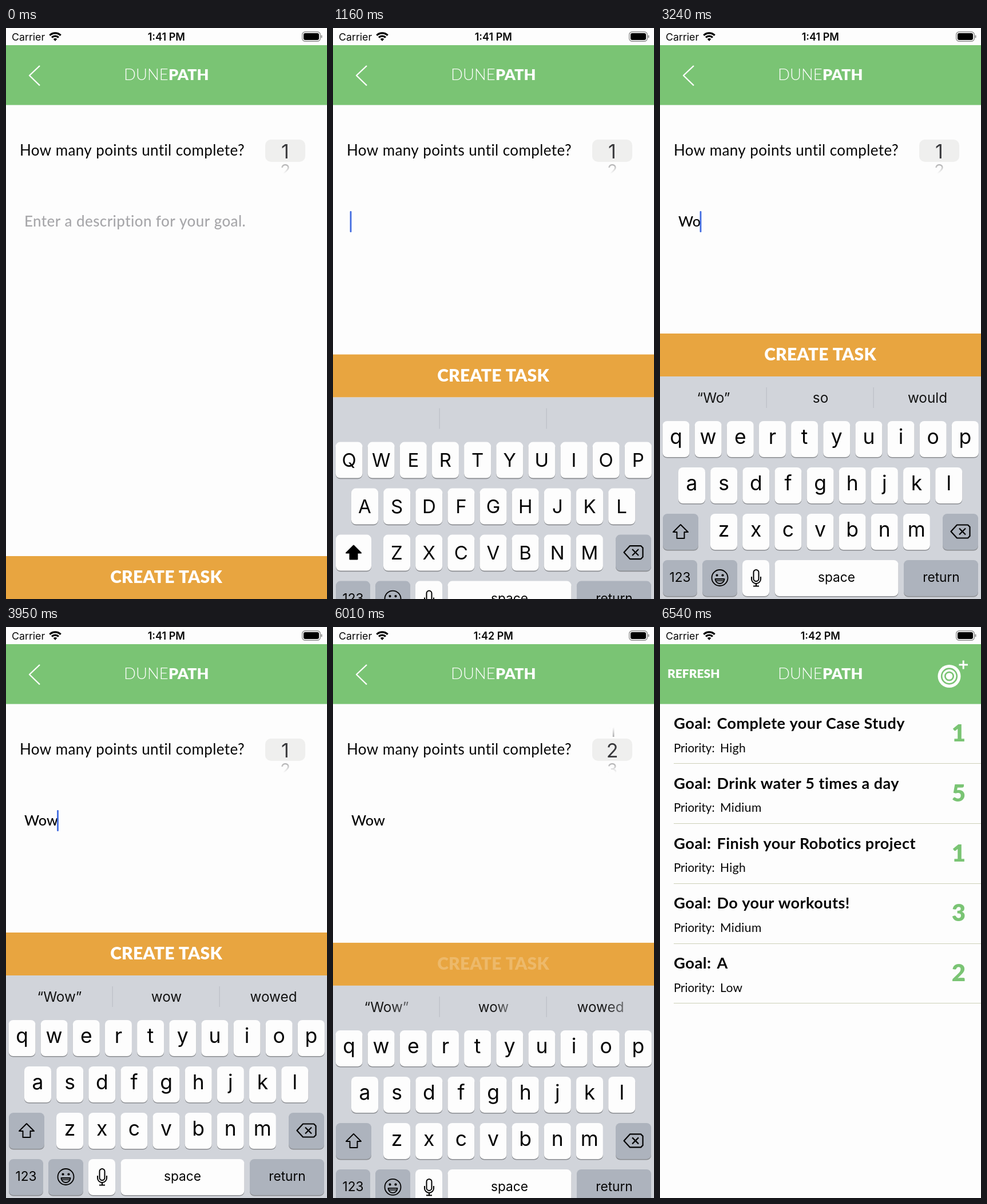
An HTML page with a canvas for the animation above (6.58 s loop, 561 px wide and 998 px high).

```html
<!DOCTYPE html>
<html lang="en">
<head>
<meta charset="utf-8">
<title>Goal tracker</title>
<style>
  html, body { margin: 0; width: 100%; height: 100%; overflow: hidden; background: #fdfdfd; }
  canvas { display: block; width: 100vw; height: 100vh; }
</style>
</head>
<body>
<canvas id="stage" width="561" height="998"></canvas>
<script>
const W = 561, H = 998, LOOP = 6580;
const ctx = document.getElementById('stage').getContext('2d');

const PAPER = '#fdfdfd', GREEN = '#7ac474', ORANGE = '#e8a540', INK = '#050505';
const BOARD = '#d1d4da', GREY_KEY = '#adb3bd', KEY_SHADOW = '#8b8d91';
const LATO = 'Lato, sans-serif', INTER = 'Inter, sans-serif';

// Timeline in ms
const OPEN = 900, CLOCK = 4500, DRAG = 4880, DRAG_END = 5600;
const PRESS = 5910, HIDE = 5988.7, DISMISS = 6015, LISTED = 6540;
const KEY_TAPS = [
  { key: 'W', down: 1980, up: 2120 },
  { key: 'o', down: 2840, up: 2970 },
  { key: 'w', down: 3770, up: 3900 }
];
const TYPED = ['', 'W', 'Wo', 'Wow'];
const CARET_X = [31, 56, 71, 90.5];
const HINTS = [[], ['“W”', 'We', 'What'], ['“Wo”', 'so', 'would'], ['“Wow”', 'wow', 'wowed']];
const GOALS = [
  ['Complete your Case Study', 'High', 1],
  ['Drink water 5 times a day', 'Midium', 5],
  ['Finish your Robotics project', 'High', 1],
  ['Do your workouts!', 'Midium', 3],
  ['A', 'Low', 2]
];

const clamp = v => Math.max(0, Math.min(1, v));
const smooth = v => { v = clamp(v); return v * v * (3 - 2 * v); };
const spring = ms => {
  const x = Math.max(0, ms) * 0.0152;
  return 1 - (1 + x) * Math.exp(-x);
};

function text(str, x, y, size, { font = LATO, weight = 400, color = INK, align = 'left', gap = 0 } = {}) {
  ctx.font = `${weight} ${size}px ${font}`;
  ctx.letterSpacing = gap + 'px';
  ctx.textAlign = align;
  ctx.fillStyle = color;
  ctx.fillText(str, x, y);
}

function box(x, y, w, h, color) {
  ctx.fillStyle = color;
  ctx.fillRect(x, y, w, h);
}

function pill(x, y, w, h, r, color) {
  ctx.beginPath();
  ctx.roundRect(x, y, w, h, r);
  ctx.fillStyle = color;
  ctx.fill();
}

function line(points, color, width, closed) {
  ctx.beginPath();
  points.forEach(([x, y]) => ctx.lineTo(x, y));
  if (closed) ctx.closePath();
  ctx.strokeStyle = color;
  ctx.lineWidth = width;
  ctx.stroke();
}

function arc(x, y, r, from, to, color, width) {
  ctx.beginPath();
  ctx.arc(x, y, r, from, to);
  ctx.strokeStyle = color;
  ctx.lineWidth = width;
  ctx.stroke();
}

function disc(x, y, r, color) {
  ctx.beginPath();
  ctx.arc(x, y, r, 0, 7);
  ctx.fillStyle = color;
  ctx.fill();
}

function statusBar(t) {
  box(0, 0, W, 30, PAPER);
  text('Carrier', 10, 22, 17.8, { font: INTER });
  text(t < CLOCK ? '1:41 PM' : '1:42 PM', 280.3, 22, 18, { font: INTER, weight: 600, align: 'center' });
  const from = -Math.PI * 0.75, to = -Math.PI * 0.25;
  arc(86, 22.5, 13.6, from, to, '#000', 3.3);
  arc(86, 22.5, 8.4, from, to, '#000', 3.3);
  ctx.beginPath();
  ctx.moveTo(86, 23);
  ctx.arc(86, 22.5, 4.6, from, to);
  ctx.fillStyle = '#000';
  ctx.fill();
  ctx.beginPath();
  ctx.roundRect(517.7, 6.7, 31.6, 16.6, 5);
  ctx.strokeStyle = '#8c8c8c';
  ctx.lineWidth = 1.4;
  ctx.stroke();
  pill(520, 9, 27, 12, 3, '#000');
  pill(550.5, 12.5, 2, 5, 1, '#8c8c8c');
}

function header() {
  box(0, 30, W, 104.6, GREEN);
  text('DUNE', 206, 91, 27.5, { weight: 300, color: '#fff' });
  text('PATH', 284, 91, 27, { weight: 900, color: '#fff' });
}

function goalList() {
  box(0, 0, W, H, PAPER);
  header();
  text('REFRESH', 13, 89, 21, { weight: 900, color: '#fff' });
  disc(505.5, 86, 20, '#fff');
  arc(505.5, 86, 13.3, 0, 7, GREEN, 2.7);
  arc(505.5, 86, 7.2, 0, 7, GREEN, 2.7);
  line([[522.5, 66], [538, 66]], '#fff', 3);
  line([[530.2, 58.5], [530.2, 73.5]], '#fff', 3);
  GOALS.forEach(([name, priority, points], i) => {
    const y = i * 104.75;
    text('Goal:', 24, y + 178, 27.5, { weight: 700, gap: 0.4 });
    text(name, 99.5, y + 178, 27, { weight: 700, gap: 0.45 });
    text('Priority:', 24, y + 218.5, 20.5);
    text(priority, 105, y + 218.5, 21, { gap: 0.4 });
    text(points, 522, y + 200, 42, { weight: 900, color: GREEN, align: 'center' });
    box(24, Math.round(y + 238.3), W - 24, 1, '#cdd0b8');
  });
}

function wheel(t) {
  const pos = t < DRAG ? 0 : 0.085 + 0.915 * smooth((t - DRAG) / (DRAG_END - DRAG));
  pill(453, 195, 70, 39, 10, '#efefee');
  ctx.save();
  ctx.beginPath();
  ctx.rect(453, 173, 70, 84);
  ctx.clip();
  for (let n = 1; n <= 4; n++) {
    const angle = (n - 1 - pos) * 0.6;
    if (Math.abs(angle) > 1.3) continue;
    ctx.save();
    ctx.translate(488, 215.5 + 60 * Math.sin(angle));
    ctx.scale(0.3 + 0.7 * Math.cos(angle), Math.cos(angle));
    text(n, 0, 12, 34, { font: INTER, color: '#38383b', align: 'center' });
    ctx.restore();
  }
  [[234, 257], [195, 173]].forEach(([near, far]) => {
    const fade = ctx.createLinearGradient(0, near, 0, far);
    fade.addColorStop(0, 'rgba(253,253,253,.5)');
    fade.addColorStop(0.9, PAPER);
    box(453, Math.min(near, far), 70, Math.abs(far - near), fade);
  });
  ctx.restore();
}

function caretAlpha(t) {
  if (t < OPEN || t >= HIDE) return 0;
  const resets = [OPEN, ...KEY_TAPS.map(k => k.up)];
  const since = (t - resets.filter(r => r <= t).pop()) % 980;
  return 1 - clamp((since - 570) / 130);
}

function goalForm(t, count, drop) {
  box(0, 30, W, H, PAPER);
  header();
  line([[59, 66], [41, 83], [59, 100.5]], '#fff', 2.4);
  text('How many points until complete?', 24, 223, 26, { gap: 0.4 });
  wheel(t);
  if (t < OPEN) text('Enter a description for your goal.', 32, 347, 26, { weight: 500, color: '#a7a7aa', gap: 0.4 });
  text(TYPED[count], 32, 347, 25.2, { weight: 500 });
  ctx.globalAlpha = caretAlpha(t);
  pill(CARET_X[count] - 1.4, 320, 2.8, 37, 1, '#416be0');
  ctx.globalAlpha = 1;
  const top = 534 + drop;
  box(0, top, W, 75, ORANGE);
  ctx.globalAlpha = t < PRESS ? 1 : 0.22 + 0.78 * clamp((t - 6010) / 300);
  text('CREATE TASK', 280, top + 47, 30, { weight: 900, color: '#fff', align: 'center', gap: 0.2 });
  ctx.globalAlpha = 1;
}

function key(x, y, w, color = PAPER) {
  pill(x, y + 1.6, w, 63, 8, KEY_SHADOW);
  pill(x, y, w, 63, 8, color);
}

// Letter rows with the left edge of their first key
const ROWS = [['qwertyuiop', 4.5], ['asdfghjkl', 32], ['zxcvbnm', 88]];
const rowY = r => 687 + 81 * r;

function letters(upper) {
  ROWS.forEach(([chars, left], r) => [...chars].forEach((c, i) => {
    const x = left + 56.15 * i, y = rowY(r);
    key(x, y, 47);
    if (upper) text(c.toUpperCase(), x + 23.5, y + 43.5, 33, { font: INTER, align: 'center' });
    else text(c, x + 23.5, y + 40, 35.5, { font: INTER, align: 'center' });
  }));
}

function shiftKey(upper) {
  key(5, rowY(2), 62, upper ? PAPER : GREY_KEY);
  const arrow = [[36, 868], [49, 881], [42.5, 881], [42.5, 892], [29.5, 892], [29.5, 881], [23, 881]];
  line(arrow, '#000', 2, true);
  if (upper) {
    ctx.fillStyle = '#000';
    ctx.fill();
  }
}

function deleteKey() {
  key(494, rowY(2), 62, GREY_KEY);
  line([[508.5, 880], [519, 868.5], [538, 868.5], [541.5, 872], [541.5, 888], [538, 891.5], [519, 891.5]], '#000', 2.2, true);
  line([[523, 874.5], [534, 885.5]], '#000', 2.2);
  line([[534, 874.5], [523, 885.5]], '#000', 2.2);
}

function bottomRow() {
  const y = rowY(3);
  const label = (str, x) => text(str, x, y + 38, 22.7, { font: INTER, align: 'center' });
  key(5, y, 60, GREY_KEY);
  label('123', 35);
  key(74, y, 61, GREY_KEY);
  arc(104.5, 961, 14, 0, 7, '#000', 1.8);
  disc(99.5, 956.5, 2.1, '#000');
  disc(109.5, 956.5, 2.1, '#000');
  ctx.beginPath();
  ctx.arc(104.5, 963, 8, 0, Math.PI);
  ctx.closePath();
  ctx.strokeStyle = '#000';
  ctx.stroke();
  line([[98, 966], [111, 966]], '#000', 1.5);
  key(144, y, 47);
  ctx.beginPath();
  ctx.roundRect(163.5, 947, 9, 20, 4.5);
  ctx.lineWidth = 2;
  ctx.stroke();
  ctx.beginPath();
  ctx.moveTo(160, 959);
  ctx.arc(168, 963, 8, Math.PI, 0, true);
  ctx.lineTo(176, 959);
  ctx.stroke();
  line([[168, 971], [168, 975.5]], '#000', 2);
  line([[163, 975.5], [173, 975.5]], '#000', 2);
  key(200.5, y, 216);
  label('space', 308.5);
  key(426, y, 130, GREY_KEY);
  label('return', 491.5);
}

// Suggestions fade out from their right end once the keyboard leaves
function hints(count, t) {
  box(185.5, 628, 1.2, 36, '#bbbec5');
  box(372.5, 628, 1.2, 36, '#bbbec5');
  const gone = clamp((t - HIDE) / 150);
  HINTS[count].forEach((word, i) => {
    const x = 93.5 + 187 * i, half = word.length * 7.5;
    const color = ctx.createLinearGradient(x - half, 0, x + half, 0);
    color.addColorStop(clamp(0.85 - 2 * gone), `rgba(17,17,17,${1 - gone * gone})`);
    color.addColorStop(1, `rgba(17,17,17,${clamp(1 - 3 * gone)})`);
    text(word, x, 655, 24.3, { font: INTER, color, align: 'center' });
  });
}

function popup(char) {
  const row = ROWS[0], i = row[0].indexOf(char.toLowerCase());
  const left = row[1] + 56.15 * i, cx = left + 23.5, y = rowY(0);
  ctx.beginPath();
  ctx.moveTo(cx - 43, y - 83);
  ctx.quadraticCurveTo(cx - 43, y - 97, cx - 29, y - 97);
  ctx.lineTo(cx + 29, y - 97);
  ctx.quadraticCurveTo(cx + 43, y - 97, cx + 43, y - 83);
  ctx.lineTo(cx + 43, y - 43);
  ctx.bezierCurveTo(cx + 43, y - 20, cx + 23.5, y - 24, cx + 23.5, y);
  ctx.lineTo(cx + 23.5, y + 55);
  ctx.quadraticCurveTo(cx + 23.5, y + 63, cx + 15.5, y + 63);
  ctx.lineTo(cx - 15.5, y + 63);
  ctx.quadraticCurveTo(cx - 23.5, y + 63, cx - 23.5, y + 55);
  ctx.lineTo(cx - 23.5, y);
  ctx.bezierCurveTo(cx - 23.5, y - 24, cx - 43, y - 20, cx - 43, y - 43);
  ctx.closePath();
  ctx.save();
  ctx.shadowColor = 'rgba(0,0,0,.4)';
  ctx.shadowBlur = 12;
  ctx.shadowOffsetY = 2;
  ctx.fillStyle = PAPER;
  ctx.fill();
  ctx.restore();
  text(char, cx, y - 36, 54, { font: INTER, weight: 300, align: 'center' });
}

function keyboard(t, count, drop) {
  const upper = count === 0;
  ctx.save();
  ctx.translate(0, drop);
  box(0, 609, W, 389, BOARD);
  hints(count, t);
  letters(upper);
  shiftKey(upper);
  deleteKey();
  bottomRow();
  const tap = KEY_TAPS.find(k => t >= k.down && t < k.up);
  if (tap) popup(tap.key);
  ctx.restore();
}

function draw(t) {
  ctx.lineJoin = 'round';
  goalList();
  if (t < LISTED) {
    const count = KEY_TAPS.filter(k => k.up <= t).length;
    const shown = t < HIDE ? spring(t - OPEN) : 1 - spring(t - HIDE);
    const drop = 389 * (1 - shown);
    ctx.save();
    ctx.translate(0, H * spring(t - DISMISS));
    goalForm(t, count, drop);
    ctx.restore();
    if (drop < 388.9) keyboard(t, count, drop);
  }
  statusBar(t);
}

const start = performance.now();
function tick() {
  draw((performance.now() - start) % LOOP);
  requestAnimationFrame(tick);
}
tick();
</script>
</body>
</html>
```
